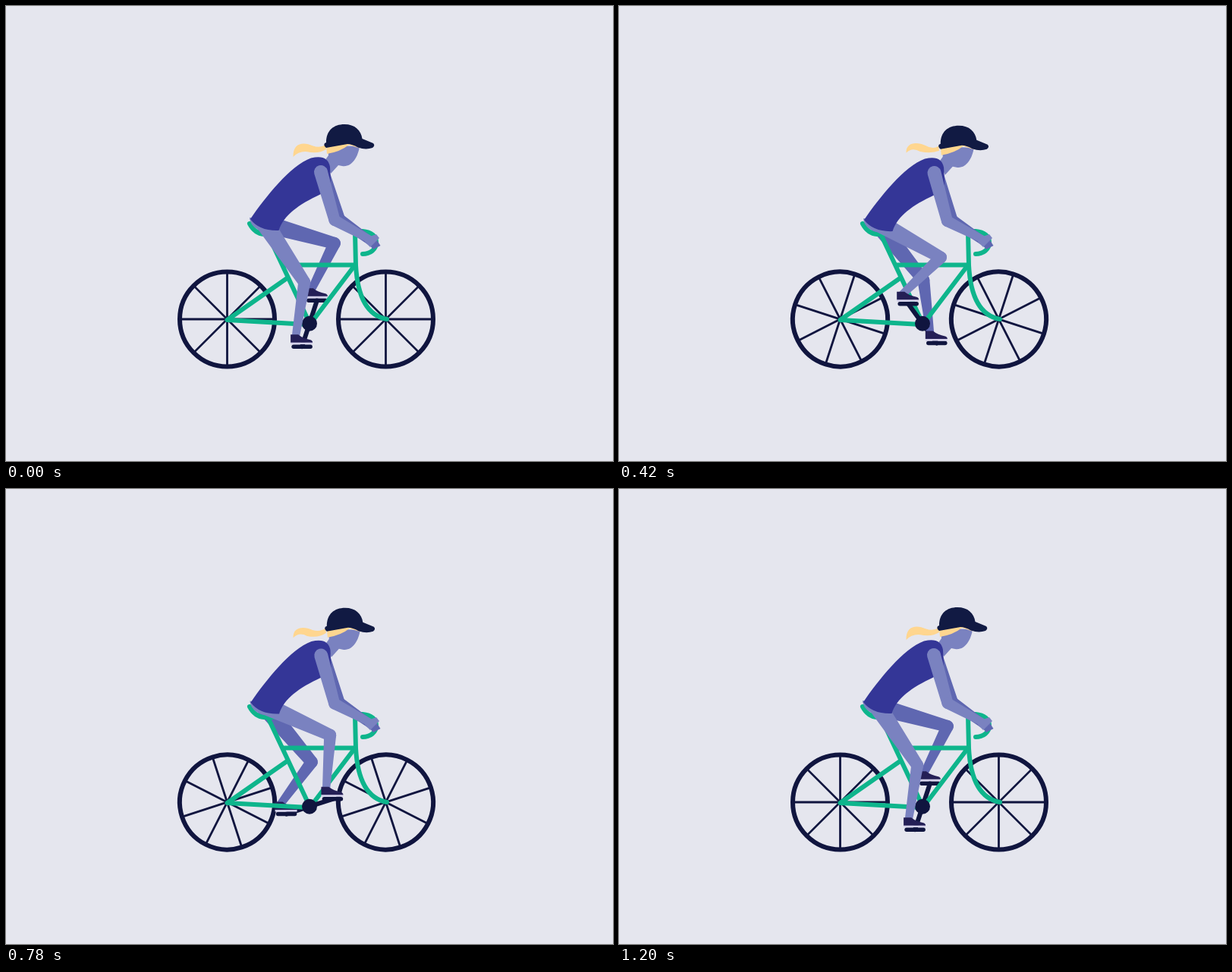
These frames come from a looping animation (800 by 600 pixels, 1.23 s). An HTML page with a canvas:

```html
<!DOCTYPE html>
<html lang="en">
<head>
<meta charset="utf-8">
<title>Cyclist</title>
<style>
html, body { margin: 0; width: 100%; height: 100%; overflow: hidden; background: #e5e6ee; }
canvas { display: block; }
</style>
</head>
<body>
<canvas id="stage" width="800" height="600"></canvas>
<script>
const ctx = document.getElementById('stage').getContext('2d');
const { sin, cos, PI } = Math;
const RAD = PI / 180;
const LOOP = 1230, STEP = 30;
const SKY = '#e5e6ee', NAVY = '#10153f', GREEN = '#0eb58c', SKIN = '#7a82c0', SHADE = '#5f67b1',
  SHIRT = '#343697', SHOE = '#241f56', SOLE = '#d3d0ea', HAIR = '#ffd68f', CAP = '#111a43';
const HUB = [400, 418.7];

function fill(path, color) {
  ctx.fillStyle = color;
  ctx.fill(new Path2D(path));
}

function stroke(path, color, width) {
  ctx.strokeStyle = color;
  ctx.lineWidth = width;
  ctx.stroke(new Path2D(path));
}

function at(x, y, draw) {
  ctx.save();
  ctx.translate(x, y);
  draw();
  ctx.restore();
}

// Tapered segment with round ends.
function segment([ax, ay], ra, [bx, by], rb, color) {
  const a = Math.atan2(by - ay, bx - ax);
  ctx.beginPath();
  ctx.arc(ax, ay, ra, a + PI / 2, a + PI * 1.5);
  ctx.arc(bx, by, rb, a - PI / 2, a + PI / 2);
  ctx.fillStyle = color;
  ctx.fill();
}

function wheel(x, y, turn) {
  at(x, y, () => {
    ctx.rotate(turn);
    for (let i = 0; i < 4; i++) {
      stroke('M-61 0H61', NAVY, 2.8);
      ctx.rotate(PI / 4);
    }
    stroke('M62.5 0A62.5 62.5 0 1 1 -62.5 0A62.5 62.5 0 1 1 62.5 0Z', NAVY, 6);
  });
}

function pedalAt(angle) {
  return [HUB[0] + 32 * cos(angle), HUB[1] + 32 * sin(angle)];
}

function crank(angle) {
  const [x, y] = pedalAt(angle);
  stroke(`M${HUB}L${x} ${y}`, NAVY, 6);
  stroke(`M${x - 11} ${y}h22`, NAVY, 5.5);
}

// The thigh swings with the crank; the shin joins the knee to the foot.
function leg([hx, hy], angle, color) {
  const thigh = RAD * (38 + 18.9 * sin(angle) - 7.2 * cos(angle)
    + 2.5 * sin(2 * angle) + 0.75 * cos(2 * angle));
  const knee = [hx + 95.5 * cos(thigh), hy + 95.5 * sin(thigh)];
  const [px, py] = pedalAt(angle);
  segment([hx, hy], 12, knee, 8, color);
  segment(knee, 8, [px - 8.5, py - 12], 5, color);
  at(px, py, () => {
    fill('M-15 -6H14V-3H-15Z', SOLE);
    fill('M-15 -16H-5Q1 -11 11 -9Q14 -8 14 -5.5H-15Z', SHOE);
  });
}

function frame() {
  stroke('M321 287Q328 300 340 301H352M346 303L400 418M366 341.5H460L402 418', GREEN, 6);
  stroke('M371 358.5L291.5 414L398 420', GREEN, 6);
  stroke('M460 298L461 342C463 380 474 408 502 413', GREEN, 6);
  stroke('M460 297H470C482 298 488 304 488 312C488 321 480 327 470 327', GREEN, 6);
}

function head(bob, beat) {
  const tip = 196 + 3 * cos(beat) + 1.3 * sin(beat);
  const crest = 181.8 + sin(beat) - 0.6 * cos(beat);
  fill(`M421 ${183 + bob}Q414 ${188 + bob} 404 ${crest + 3}C393 ${crest - 2} 378 ${crest - 2} 378.5 ${tip}
    Q386 ${tip - 8} 397 ${crest + 11}Q412 ${crest + 14} 422 ${189 + bob}Z`, HAIR);
  at(bob, bob, () => {
    fill('M424 184L466 185C464 199 456 213 443 211L438 210L428 221L420 204L425 197Z', SKIN);
    fill('M422 184L453 181L467 188L452 183Q441 192 423 195Z', HAIR);
    fill(`M422 180C422 164 432 156 446 156C460 156 468 164 469.5 175L484 181Q487 184 483 187
      Q474 190 464 186.5Q456 182 450 182L422 187Q418 184 420 181Z`, CAP);
  });
}

function draw(t) {
  const angle = RAD * (108 + 0.3 * t);
  const beat = 2 * PI * t / 600;
  const bob = 1 - cos(beat) - 0.5 * sin(beat);
  const sway = 0.6 * bob;

  ctx.fillStyle = SKY;
  ctx.fillRect(0, 0, 800, 600);
  ctx.lineCap = ctx.lineJoin = 'round';

  wheel(291.5, 413, RAD * 0.15 * t);
  wheel(500.5, 413, RAD * 0.15 * t);
  crank(angle + PI);
  leg([341 + sway / 2, 287], angle + PI, SHADE);
  frame();
  crank(angle);
  ctx.beginPath();
  ctx.arc(...HUB, 10, 0, 2 * PI);
  ctx.fillStyle = NAVY;
  ctx.fill();

  const elbow = [440 - sway / 2, 281 + sway];
  segment([418 + sway, 222 + sway], 9, elbow, 7, SHADE);
  segment(elbow, 7, [483, 312], 5.5, SHADE);
  fill('M478 314L489 309L493.5 316L484 321Z', SHADE);

  at(sway, sway, () => fill('M321 279Q322 292 338 297H358L360 285Z', SKIN));
  leg([340 + sway / 2, 285], angle, SKIN);
  head(bob, beat);
  at(sway, sway, () => fill(`M322 281C342 252 375 210 402 200.5Q424 195 427 212L428 234Q427 242 415 248
    C385 262 366 276 359.5 296Q334 297 322 281Z`, SHIRT));

  const nearElbow = [433 - sway / 2, 282.5 + sway];
  segment([415 + sway / 2, 219 + sway], 9, nearElbow, 7.5, SKIN);
  segment(nearElbow, 7.5, [478, 307], 5, SKIN);
  fill('M474 306L488 301L492 306L480 318L473 311Z', SKIN);
}

function tick() {
  const t = performance.now() % LOOP;
  draw(Math.floor(t / STEP) * STEP);
  requestAnimationFrame(tick);
}
tick();
</script>
</body>
</html>
```
